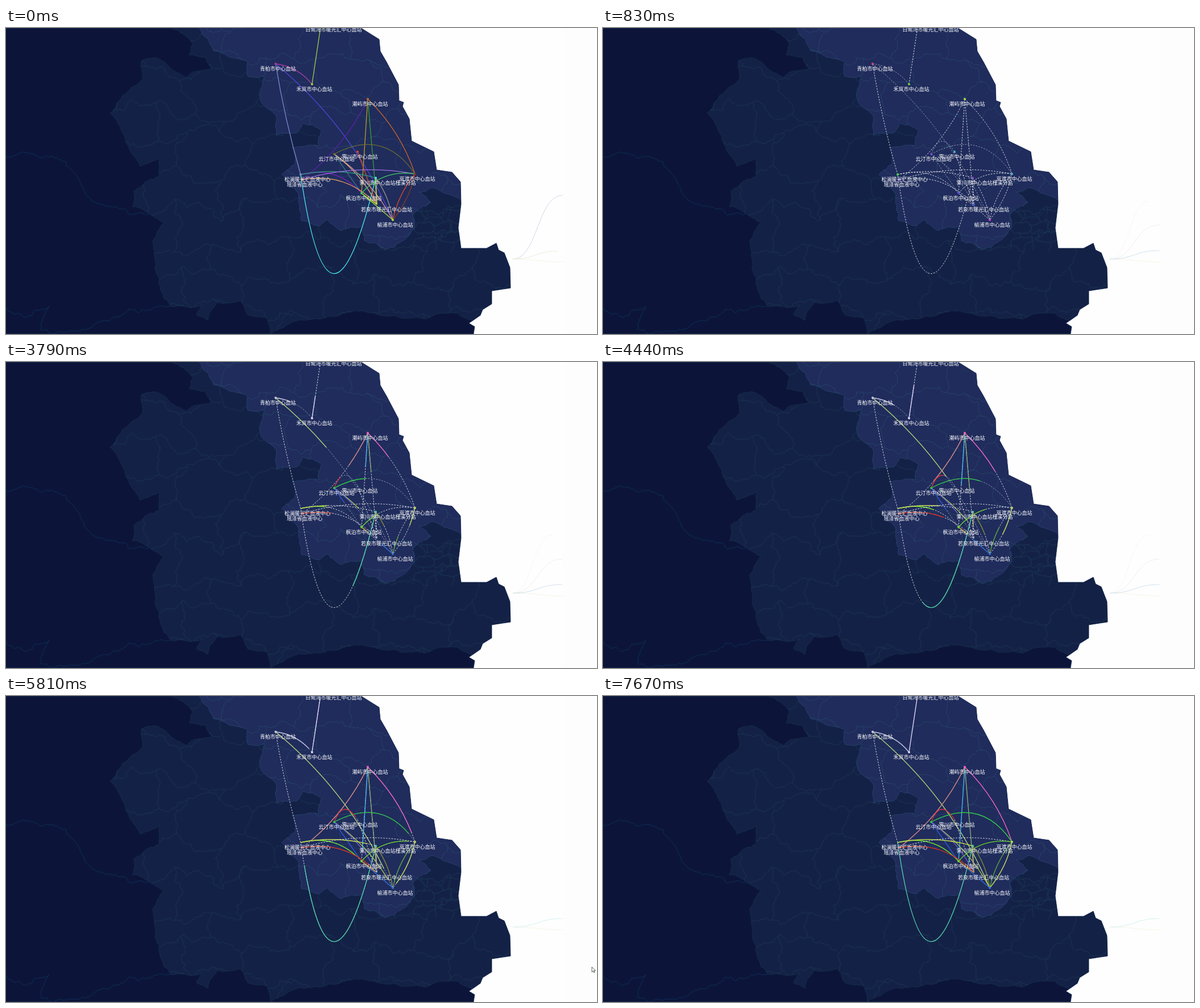
An HTML page with a canvas that plays this animation: 1039x539 px, repeating every 7.89 s.

```html
<!DOCTYPE html>
<html lang="zh">
<head>
<meta charset="utf-8">
<style>
html, body { margin: 0; width: 100%; height: 100%; overflow: hidden; background: #fefefe; }
canvas { display: block; }
</style>
</head>
<body>
<canvas id="stage" width="1039" height="539"></canvas>
<script>
const W = 1039, H = 539, LOOP = 7890, BLANK = 150, RELOAD = 830, REVEAL = 970;
const ctx = document.getElementById('stage').getContext('2d');

let seed = 7;
const random = () => (seed = seed * 16807 % 2147483647) / 2147483647;
const spread = amount => (random() - 0.5) * amount;
const clamp = x => Math.min(1, Math.max(0, x));
const randomColor = () => `hsl(${random() * 360}, 65%, 55%)`;

const station = (x, y, label, dx = 4, dy = 8.5) => ({ x, y, label, lx: x + dx, ly: y + dy, idle: randomColor() });
const stations = {
  a: station(554, -8, '白鹭湾市暖光汇中心血站', 22, 11),
  b: station(474, 63, '青柏市中心血站'),
  c: station(538, 99, '禾岚市中心血站'),
  d: station(636, 125, '潮屿市中心血站'),
  e: station(577, 222, '云汀市中心血站'),
  f: station(618, 218, '霁川市中心血站'),
  g: station(518, 258, '松澜暖光汇血液中心', 12),
  h: station(521, 267, '瑶泽省血液中心'),
  i: station(650, 264, '霁川市中心血站槿溪分站', 21),
  j: station(719, 257, '岚渡市中心血站'),
  k: station(625, 291, '枫泊市中心血站'),
  l: station(652, 311, '若泉市暖光汇中心血站', 17),
  m: station(680, 338, '榆浦市中心血站')
};

// Control point lies off the chord's middle by bend times its length
function route(ends, first, second, bend = 0.12) {
  const [p, q] = [...ends].map(key => stations[key]);
  const dx = q.x - p.x, dy = q.y - p.y;
  const cx = (p.x + q.x) / 2 + dy * bend, cy = (p.y + q.y) / 2 - dx * bend;
  const d = `M${p.x} ${p.y}Q${cx} ${cy} ${q.x} ${q.y}`;
  const node = document.createElementNS('http://www.w3.org/2000/svg', 'path');
  node.setAttribute('d', d);
  return { from: p, path: new Path2D(d), length: node.getTotalLength(), first, second, faint: 'be'.includes(ends[0]) };
}

// ends, colour of the previous run, colour of the growing run, bend
const routes = [
  route('bc', '#a23c9e', '#c4c4e0', 0.2),
  route('ca', '#a4cc4c', '#e0d4f4', 0),
  route('bm', '#5044d8', '#b0d078'),
  route('gb', '#8088d0', null, 0.03),
  route('ig', '#48e8f0', '#50d0a8', 2.6),
  route('dj', '#c86428', '#f064c0'),
  route('dh', '#6020a8', '#d88c88'),
  route('dk', '#b8a020', '#48b4f0', 0),
  route('dl', '#38a030', '#88a878', 0),
  route('ej', '#6c6c30', '#30c848', 0.45),
  route('ef', null, '#d03038', 1),
  route('fl', '#d85028', null, 0),
  route('em', '#d890a0', '#a8c850'),
  route('ek', '#3a8088', '#2858d8', 0),
  route('el', '#e0b880', '#6c60d8'),
  route('gk', '#8020c0', '#68e030', 0.3),
  route('hl', '#f0a060', '#c83020', 0.27),
  route('gi', '#30a080', '#c0d850'),
  route('hj', '#a070e0', null),
  route('kj', '#40c860', '#68d030', 0.27),
  route('mk', '#a8e040', '#3070e0', 0),
  route('kl', '#80e020', '#d8a030', 0),
  route('im', '#909090', '#7c8434'),
  route('il', '#e0e060', '#b0a080', 0),
  route('mj', '#d84828', '#58a040'),
  route('jm', '#803828', '#c0d860')
];

// Key points of the outlines; the roughness is generated
const coast = '0,0 624,0 656,20 658,41 669,60 690,100 691,128 699,131 697,138 709,160 713,199 752,218 757,250 784,254 799,271 800,310 795,352 800,388 845,388 862,379 866,391 876,396 886,422 887,458 854,463 854,486 838,496 834,506 814,520 824,526 822,539 0,539';
const inland = '291,0 328,28 322,48 352,52 362,72 328,78 318,88 288,70 262,52 238,58 240,90 214,112 183,150 205,185 235,243 270,228 270,260 225,287 222,315 256,330 278,342 258,375 262,425 290,490 347,487 335,505 355,515 372,483 412,480 425,505 460,512 465,539 900,539 900,0';
const bright = '340,0 365,40 425,60 425,85 455,85 448,130 475,155 475,188 510,185 522,168 555,180 550,208 503,210 508,240 485,258 513,290 520,340 552,348 565,338 590,357 625,350 630,375 668,390 718,352 715,330 747,307 726,289 750,281 800,303 900,303 900,0';
const farBorder = '0,228 80,226 105,235 138,290 190,315 250,328';
const southBorder = '0,490 35,510 75,490 60,530 145,530 215,495 290,490';

const points = text => text.split(' ').map(pair => pair.split(',').map(Number));

// Polyline broken up by midpoint displacement
function trace(list, wobble) {
  const path = new Path2D();
  const split = ([x, y], [u, v]) => {
    if (!wobble || Math.hypot(u - x, v - y) < 5) return path.lineTo(u, v);
    const r = spread(wobble);
    const middle = [(x + u) / 2 - (v - y) * r, (y + v) / 2 + (u - x) * r];
    split([x, y], middle);
    split(middle, [u, v]);
  };
  path.moveTo(...list[0]);
  for (let n = 1; n < list.length; n++) split(list[n - 1], list[n]);
  return path;
}

// District borders: a jittered brick pattern with ragged edges
function districts(c, x, y, w, h, step, color) {
  const cols = Math.ceil(w / step), rows = Math.ceil(h / step);
  const nodes = Array.from({ length: rows + 1 }, (_, r) =>
    Array.from({ length: cols + 1 }, (_, n) => [x + n * step + spread(step * 0.7), y + r * step + spread(step * 0.7)]));
  c.strokeStyle = color;
  for (let r = 0; r < rows; r++) {
    for (let n = 0; n < cols; n++) {
      c.stroke(trace([nodes[r][n], nodes[r][n + 1]], 0.5));
      if ((r + n) % 2) c.stroke(trace([nodes[r][n], nodes[r + 1][n]], 0.5));
    }
  }
}

function drawMap() {
  const canvas = document.createElement('canvas');
  canvas.width = W;
  canvas.height = H;
  const c = canvas.getContext('2d');
  const region = (outline, fill, edge, wobble) => {
    const path = trace(points(outline), wobble);
    c.fillStyle = fill;
    c.fill(path);
    c.strokeStyle = edge;
    c.stroke(path);
    c.clip(path);
  };
  c.lineWidth = 0.8;
  region(coast, '#0c1539', '#1c3a62', 0);
  c.strokeStyle = '#0f3462';
  for (const line of [farBorder, southBorder]) c.stroke(trace(points(line), 0.35));
  region(inland, '#142146', '#17324f', 0.2);
  districts(c, 200, 30, 640, 520, 58, '#1a3a55');
  districts(c, 718, 325, 70, 55, 16, '#1b3f58');
  region(bright, '#202c5c', '#24486e', 0.2);
  districts(c, 340, 0, 460, 390, 52, '#264a6c');
  return canvas;
}
const map = drawMap();

function stroke(path, color, width, dash = [], alpha = 1) {
  ctx.globalAlpha = alpha;
  ctx.strokeStyle = color;
  ctx.lineWidth = width;
  ctx.setLineDash(dash);
  ctx.stroke(path);
  ctx.setLineDash([]);
  ctx.globalAlpha = 1;
}

// Pale S-curve beside the coast
function branch(x, y, color) {
  const mid = (891 + x) / 2;
  stroke(new Path2D(`M891 407C${mid} 407 ${mid} ${y} ${x} ${y}`), color, 1);
}

function drawBranches(t) {
  branch(978, 412, '#f8f4e4');
  if (t < BLANK) {
    branch(978, 295, '#d4d4ea');
    branch(970, 393, '#eeeedc');
  } else if (t < 5600) {
    branch(960, 305, '#f7f7f7');
    branch(978, 347, '#efefef');
    branch(978, 392, '#cfe2ee');
  } else {
    branch(978, 392, '#d4f2f0');
  }
}

function drawRoutes(t) {
  const progress = (1 - Math.cos(Math.PI * clamp((t - 1600) / 5350))) / 2;
  for (const { path, length, first, second, faint } of routes) {
    if (t < BLANK) {
      if (first) stroke(path, first, 1.3);
      continue;
    }
    if (progress < 1 || !second) stroke(path, '#fff', faint ? 0.8 : 1, [2.6, 2.2], faint ? 0.65 : 0.85);
    if (second && progress > 0) stroke(path, second, 1.4, progress < 1 ? [progress * length, length + 9] : []);
  }
}

function drawStations(t) {
  for (const s of Object.values(stations)) {
    const start = routes.find(r => r.from === s);
    const color = t >= BLANK && t < REVEAL ? s.idle : start && (t < BLANK ? start.first : start.second);
    if (color) {
      ctx.fillStyle = color;
      ctx.beginPath();
      ctx.arc(s.x, s.y, 2, 0, 7);
      ctx.fill();
    }
  }
  ctx.fillStyle = '#fff';
  ctx.font = '9px "Noto Sans CJK SC", "Noto Sans CJK", sans-serif';
  ctx.textAlign = 'center';
  ctx.textBaseline = 'middle';
  for (const s of Object.values(stations)) ctx.fillText(s.label, s.lx, s.ly);
}

function drawCursor(t) {
  if (t < 5600 || t > 6650) return;
  const arrow = new Path2D('M0 0V9L2.2 7L3.6 10L5 9.4L3.7 6.5H6.5Z');
  ctx.save();
  ctx.translate(1030, 455 + 74 * clamp((t - 5600) / 700));
  ctx.fillStyle = '#fff';
  ctx.fill(arrow);
  stroke(arrow, '#333', 0.8);
  ctx.restore();
}

function draw() {
  const t = performance.now() % LOOP;
  ctx.fillStyle = '#fefefe';
  ctx.fillRect(0, 0, W, H);
  ctx.fillStyle = '#fdfdfd';
  ctx.fillRect(979, 0, 60, H);
  if (t < BLANK || t >= RELOAD) {
    ctx.drawImage(map, 0, 0);
    drawBranches(t);
    drawRoutes(t);
    drawStations(t);
    drawCursor(t);
  }
  requestAnimationFrame(draw);
}
draw();
</script>
</body>
</html>
```
